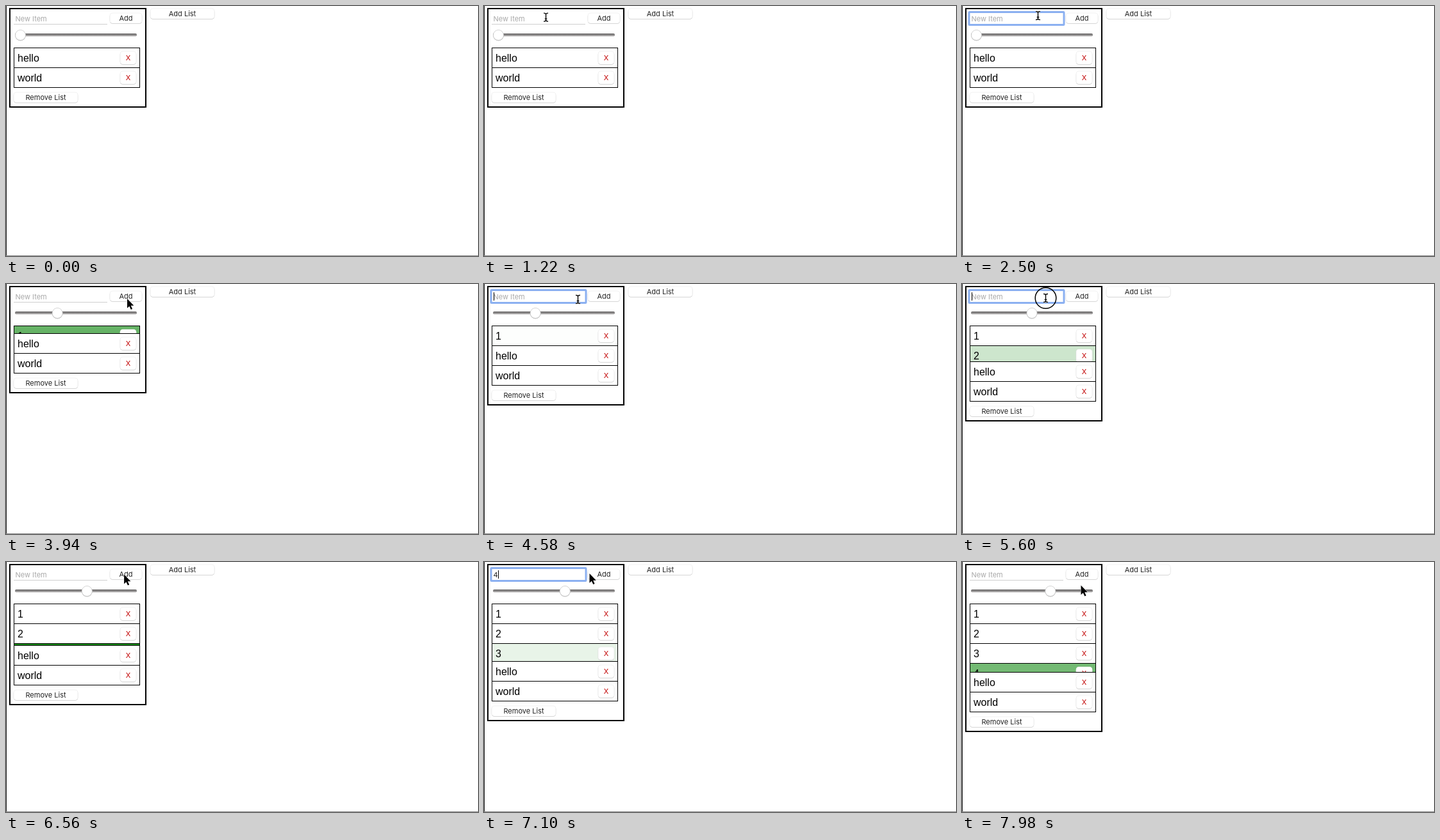
These frames come from a looping animation (736 px wide and 391 px high, 8 s). An HTML page:

```html
<!DOCTYPE html>
<html lang="en">
<head>
<meta charset="utf-8">
<title>Animated lists</title>
<style>
  html, body { margin: 0; width: 100%; height: 100%; overflow: hidden; background: #fff; }
  svg { display: block; width: 100vw; height: 100vh; }
  text { font: 11px Inter, "Noto Sans", sans-serif; fill: #222; white-space: pre; }
  .item { font: 16px "Liberation Sans", Arial, sans-serif; fill: #000; }
  .mid { text-anchor: middle; }
  .x { fill: #c00000; }
  .hint { fill: #a9a9a9; }
  .crisp { shape-rendering: crispEdges; }
</style>
</head>
<body>
<svg id="stage" viewBox="0 0 736 391">
  <defs>
    <linearGradient id="groove" x2="0" y2="1">
      <stop offset="0" stop-color="#626060"/>
      <stop offset=".5" stop-color="#8c8a8a"/>
      <stop offset="1" stop-color="#c2c0c0"/>
    </linearGradient>
  </defs>
  <rect width="736" height="391" fill="#fff"/>
  <rect class="crisp" width="1" height="391" fill="#1c1c1c"/>
  <rect class="crisp" y="390" width="736" height="1" fill="#8a8a8a"/>
</svg>
<script>
const LOOP = 8000, ROW = 31, TOP = 65;
const stage = document.getElementById('stage');

function add(parent, tag, attrs, text) {
  const el = document.createElementNS('http://www.w3.org/2000/svg', tag);
  for (const k in attrs) el.setAttribute(k, attrs[k]);
  if (text) el.textContent = text;
  parent.appendChild(el);
  return el;
}
const set = (el, attrs) => { for (const k in attrs) el.setAttribute(k, attrs[k]); };
const show = (el, on) => el.setAttribute('display', on ? 'inline' : 'none');
const within = (t, [a, b]) => t >= a && t < b;

function button(parent, x, y, width, height, label, cls = '') {
  const g = add(parent, 'g', {});
  add(g, 'rect', { x: x - .2, y: y + .8, width: width + .4, height, rx: 4.3, fill: '#c9c9c9' });
  add(g, 'rect', { x: x - .3, y: y - .3, width: width + .6, height: height + .4, rx: 4.3, fill: '#e4e4e4' });
  add(g, 'rect', { x: x + .3, y: y + .3, width: width - .6, height: height - .4, rx: 3.8, fill: '#fff' });
  add(g, 'text', { x: x + width / 2, y: y + height / 2 + 4, class: 'mid ' + cls }, label);
  return g;
}

// One round per new item: focus click, typing, pointer shown again, press and release on Add
const rounds = [
  { focus: [1980, 2060], type: 2760, wake: 3020, press: [3600, 3694] },
  { focus: [4300, 4420], type: 4660, wake: 4740, press: [5010, 5100] },
  { focus: [5560, 5640], type: 5800, wake: 5900, press: [6320, 6460] },
  { focus: [6780, 6870], type: 6980, wake: 7040, press: [7620, 7710] }
];

// Pointer stops: time, x, y
const path = [
  [280, 153, 355], [299, 153, 355], [300, 126, 234], [500, 126, 234], [560, 119, 170],
  [640, 165, 70], [720, 198, -20], [980, 198, -20], [1080, 258, 8], [1240, 90, 18],
  [1350, 1, 12], [1620, 118.5, 15], [3020, 118.5, 15], [3300, 188, 19], [3694, 188, 19],
  [3940, 188.5, 22.5], [4200, 146.5, 24], [4740, 146.5, 24], [4960, 187, 19], [5140, 187, 19],
  [5400, 130.5, 22], [5900, 130.5, 22], [6140, 188, 19], [6520, 188, 19], [6740, 140, 19],
  [7040, 140, 18], [7100, 164, 17.5], [7300, 187, 18], [7740, 187, 18], [7980, 185, 36], [8000, 185, 37]
];

// Static and moving parts
const frame = add(stage, 'rect', { x: 6, y: 4, width: 212, fill: '#fff', stroke: '#000', 'stroke-width': 2, class: 'crisp' });
button(stage, 225, 4, 100, 16, 'Add List');
button(stage, 162, 11, 50, 16, 'Add');
const line = add(stage, 'path', { d: 'M12 28.5H158', stroke: '#cfcfcf', class: 'crisp' });
const ring = add(stage, 'rect', { x: 11, y: 9.5, width: 148, height: 20, rx: 1, fill: '#fff', stroke: '#8bb0f1', 'stroke-width': 3 });
const hint = add(stage, 'text', { x: 14.5, y: 24, class: 'hint' }, 'New Item');
const typed = add(stage, 'text', { x: 14.5, y: 24 });
const caret = add(stage, 'rect', { y: 13, width: 1, height: 13, fill: '#000', class: 'crisp' });
add(stage, 'rect', { x: 14, y: 43, width: 190, height: 4.6, rx: 2, fill: 'url(#groove)' });
const thumb = add(stage, 'g', {});
add(thumb, 'circle', { cy: 46, r: 8.4, fill: '#b5b5b5' });
add(thumb, 'circle', { cy: 45.5, r: 8, fill: '#fff', stroke: '#c4c4c4', 'stroke-width': .6 });

const rows = ['1', '2', '3', '4', 'hello', 'world'].map(label => {
  const g = add(stage, 'g', {});
  const back = add(g, 'rect', { x: 12.5, y: .5, width: 196, height: ROW, fill: '#fff', stroke: '#000', class: 'crisp' });
  add(g, 'text', { x: 18, y: 22, class: 'item' }, label);
  button(g, 178, 6, 25, 20, 'X', 'x');
  return { g, back };
});
const remove = button(stage, 12, 135, 100, 16, 'Remove List');

const pointer = add(stage, 'g', {});
const arrow = add(pointer, 'path', {
  d: 'M.5 .5V15.2L3.8 12.2L6.3 17.6L8.6 16.6L6.2 11.3H10.8Z',
  fill: '#000', stroke: '#fff', 'stroke-width': 1, 'paint-order': 'stroke'
});
const beam = add(pointer, 'g', { fill: 'none' });
for (const [stroke, w] of [['#fff', 2.6], ['#000', 1.4]]) {
  add(beam, 'path', { d: 'M-3.5 -6.5Q0 -6.5 0 -4.5Q0 -6.5 3.5 -6.5M0 -5V5M-3.5 6.5Q0 6.5 0 4.5Q0 6.5 3.5 6.5M-1.8 2.5H1.8', stroke, 'stroke-width': w });
}
const halo = add(pointer, 'circle', { r: 16.3, fill: 'none', stroke: '#000', 'stroke-width': 1.5 });

// CSS "ease" curve: cubic-bezier(.25, .1, .25, 1)
function ease(x) {
  if (x <= 0) return 0;
  if (x >= 1) return 1;
  const curve = (a, b, s) => 3 * a * s * (1 - s) ** 2 + 3 * b * s * s * (1 - s) + s ** 3;
  let lo = 0, hi = 1;
  for (let i = 0; i < 24; i++) {
    const s = (lo + hi) / 2;
    if (curve(.25, .25, s) < x) lo = s; else hi = s;
  }
  return curve(.1, 1, lo);
}

function place(t) {
  const i = path.findIndex(p => p[0] > t);
  if (i < 1) return path[0].slice(1);
  const [ta, xa, ya] = path[i - 1], [tb, xb, yb] = path[i];
  const u = (t - ta) / (tb - ta), k = u * u * (3 - 2 * u);
  return [xa + (xb - xa) * k, ya + (yb - ya) * k];
}

function drawInput(t) {
  const at = rounds.findIndex(r => within(t, [r.focus[0], r.press[1]]));
  const r = rounds[at];
  const focused = !!r && t < r.press[0];
  const text = r && t >= r.type ? String(at + 1) : '';
  show(ring, focused);
  show(line, !focused);
  show(hint, !text);
  typed.textContent = text;
  const since = r ? (text ? r.type : r.focus[0] + 20) : 0;
  show(caret, focused && t >= since && (t - since) % 1000 < 500);
  set(caret, { x: text ? 22 : 15 });
}

function drawList(t) {
  let y = TOP, count = 0;
  rows.forEach(({ g, back }, i) => {
    const start = i < rounds.length ? rounds[i].press[1] : -LOOP;
    const p = ease((t - start) / 1000);
    show(g, t >= start);
    set(g, { transform: `translate(0 ${y})` });
    const c = Math.round(255 * p);
    set(back, { fill: `rgb(${c},${Math.round(128 + 127 * p)},${c})` });
    y += Math.round(ROW * p);
    if (t >= start) count++;
  });
  const grow = y - TOP - 2 * ROW;
  set(frame, { height: 154 + grow });
  set(remove, { transform: `translate(0 ${grow})` });
  set(thumb, { transform: `translate(${22.5 + 173 * (count - 2) / count} 0)` });
}

function drawPointer(t) {
  const [x, y] = place(t);
  const text = x > 11 && x < 159 && y > 9 && y < 30;
  show(pointer, t >= 280 && !rounds.some(r => within(t, [r.type + 20, r.wake])));
  set(pointer, { transform: `translate(${x} ${y})` });
  show(arrow, !text);
  show(beam, text);
  show(halo, rounds.some(r => within(t, r.focus) || within(t, r.press)));
}

function draw(t) {
  drawInput(t);
  drawList(t);
  drawPointer(t);
}

const begin = performance.now();
function tick() {
  draw((performance.now() - begin) % LOOP);
  requestAnimationFrame(tick);
}
tick();
</script>
</body>
</html>
```
